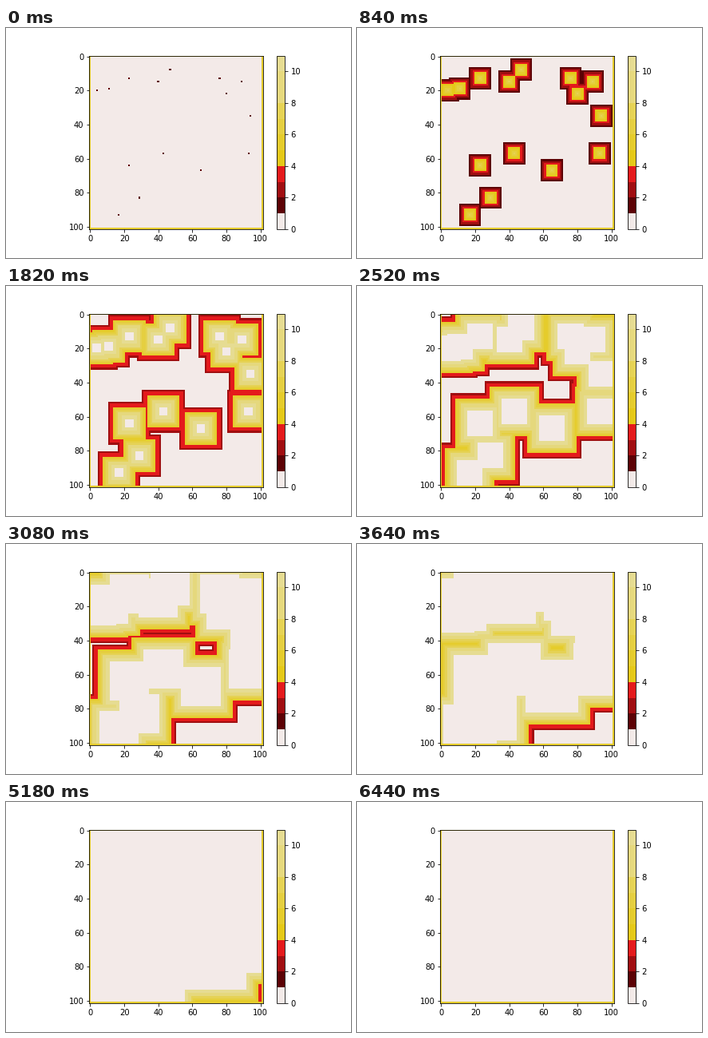
Write a matplotlib script that moves like this. It is 432 px wide and 288 px high and loops after 8000 ms.

```python
import numpy as np
import matplotlib.pyplot as plt
from matplotlib.animation import FuncAnimation
from matplotlib.colors import ListedColormap

SIZE = 102        # grid side, including the fixed border
LAST = 11         # highest state before a cell returns to rest
BORDER = 5
STEP_MS, TICK_MS, LOOP_MS = 140, 20, 8000

# Points (column, row) where the waves start
SEEDS = [(4, 20), (11, 19), (23, 13), (40, 15), (47, 8), (76, 13), (89, 15),
         (80, 22), (94, 35), (43, 57), (93, 57), (23, 64), (65, 67), (29, 83),
         (17, 93)]

plt.rcParams.update({
    "font.family": "DejaVu Sans",
    "font.size": 10,
    "figure.subplot.left": 0.125,
    "figure.subplot.right": 0.9,
    "figure.subplot.bottom": 0.125,
    "figure.subplot.top": 0.88,
})


def palette():
    rest = (243, 234, 232)
    reds = np.linspace((92, 2, 5), (228, 26, 28), 3)
    golds = np.linspace((229, 201, 24), (230, 220, 146), LAST - 4)
    golds[-3] = golds[-2]  # states 8 and 9 share a shade
    return ListedColormap(np.vstack([rest, reds, golds]) / 255)


# Steps until the wave reaches each cell: distance to the nearest seed
rows, cols = np.mgrid[:SIZE, :SIZE]
arrival = np.min([np.maximum(abs(cols - x), abs(rows - y)) for x, y in SEEDS],
                 axis=0)
edge = (np.minimum(rows, cols) == 0) | (np.maximum(rows, cols) == SIZE - 1)


def grid(step):
    state = step - arrival + 1
    state[(state < 0) | (state > LAST)] = 0
    state[edge] = BORDER
    # Values sit exactly on colour limits; at full range some drop a bin
    if state.max() == LAST:
        state[(state == 1) | (state == 4)] -= 1
    return np.minimum(state + 0.5, LAST)


fig, ax = plt.subplots(figsize=(6, 4), dpi=72)
image = ax.imshow(grid(0), cmap=palette(), vmin=0, vmax=LAST,
                  interpolation="nearest")
fig.colorbar(image, ax=ax)


def update(tick):
    image.set_data(grid(tick * TICK_MS // STEP_MS))
    return [image]


anim = FuncAnimation(fig, update, frames=LOOP_MS // TICK_MS, interval=TICK_MS,
                     repeat=True, repeat_delay=0)
plt.show()
```
